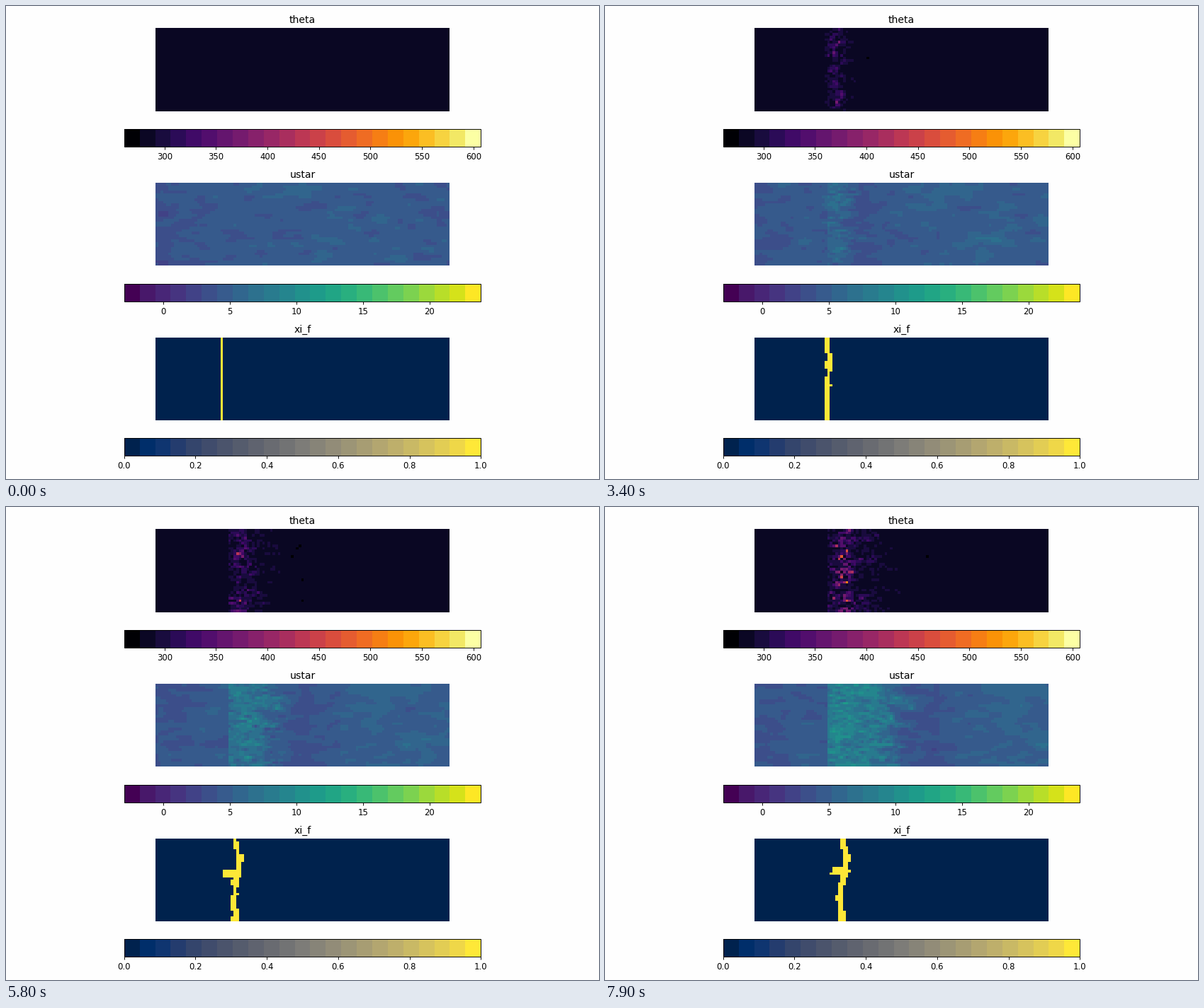
These frames come from a looping animation (837x669 px, 8000 ms). A matplotlib script:

```python
import numpy as np
import matplotlib.pyplot as plt
from matplotlib import colormaps
from matplotlib.animation import FuncAnimation
from matplotlib.colors import ListedColormap

W, H, DPI = 837, 669, 83.7
ROWS, COLS = 32, 113
FRAMES, INTERVAL = 80, 100
WIND = 7  # cells per second
BANDS = 23
PITCH = 218.8  # vertical distance between panels in pixels

# Times and rows at which part of the fire line burns on behind the rest
FINGERS = [(5.0, 9), (5.8, 13), (6.7, 22), (7.9, 12)]

PANELS = [("theta", "inferno", 260.8, 607.2),
          ("ustar", "viridis", -2.92, 23.86),
          ("xi_f", "cividis", 0, 1)]

plt.rcParams["font.family"] = "DejaVu Sans"
rng = np.random.default_rng(12)
col = np.arange(COLS)[None, :]
row = np.arange(ROWS)[:, None]


def noise_pair(length, height):
    """Two unit-variance noise sheets with streaks of the given size."""
    sheets = []
    for _ in range(2):
        sheet = rng.normal(size=(ROWS, 200))
        for axis, size in ((1, length), (0, height)):
            kernel = np.hanning(size + 2)[1:-1]
            sheet = np.apply_along_axis(np.convolve, axis, sheet, kernel, "same")
        sheets.append(sheet / sheet.std())
    return sheets


def block_pair():
    """Two random columns that are constant over groups of three rows."""
    return [np.repeat(rng.normal(size=11), 3)[:ROWS, None] for _ in range(2)]


streaks = noise_pair(9, 3)
gusts = noise_pair(3, 1)
heat = noise_pair(2, 1)
cold = noise_pair(1, 2)
line_shift, line_width = block_pair(), block_pair()


def blend(pair, t, rate):
    return np.cos(rate * t) * pair[0] + np.sin(rate * t) * pair[1]


def drift(pair, t, rate):
    """Noise carried along by the wind while it slowly changes."""
    start = 70 - round(WIND * t)
    return blend(pair, t, rate)[:, start:start + COLS]


def blob(c, r, width, height):
    return np.exp(-((col - c) / width) ** 2 - ((row - r) / height) ** 2)


def theta_field(t):
    edge = 27 if t < 4 else 28
    peak = 28 + 0.7 * t
    rise = np.clip((col - edge + 2) / (peak - edge + 2), 0, 1)
    decay = np.exp(-np.maximum(col - peak, 0) / (0.8 + 0.68 * t))
    patches = np.clip(0.85 + 0.4 * drift(streaks, t, 0.12), 0.1, 1.5)
    amount = (4 + 6 * t) * min(t / 1.2, 1)
    warm = amount * rise * decay * patches * (col >= edge)
    warm *= np.abs(drift(heat, t, 0.6)) ** 1.4
    depth = np.interp(t, [0.3, 0.9, 1.7, 3.4, 7.9], [0, 8, 8.5, 4.8, 4])
    spread = np.interp(t, [1.7, 3.4], [3, 8])
    chill = depth * np.exp(-((col - 28 - 4.5 * t) / spread) ** 2)
    return 286 + warm - chill * np.maximum(drift(cold, t, 0.1), 0)


def ustar_field(t):
    streak = drift(streaks, t, 0.12)
    field = 4.6 + 0.4 * streak
    field -= 0.75 * np.exp(-(col / 14) ** 2)
    field -= 0.8 * np.exp(-t) * (blob(2, 10, 4, 3) + blob(3, 31, 8, 2))
    field += 0.8 * blob(59 + 6.8 * t, 2, 11, 4)
    field += 0.8 * min(t / 3, 1) * blob(40 + WIND * t, 9, 7, 4)
    field += 0.8 * min(t / 3, 1) * blob(76 + 4 * t, 21, 10, 3)
    field -= 0.9 * blob(102 + WIND * t, 10, 6, 1.5)
    field += 0.04 * t * (col > 70)

    # Gusty plume behind the fire line, with calmer air ahead of it
    growth = max(t - 1.5, 0)
    reach = 1 + 4.1 * growth
    along = (col - 28) / reach
    plume = (col >= 28) / (1 + np.exp((along - 1) * reach / 2 - 1.2 * streak))
    rise = 0.5 + 0.5 * np.clip((col - 27) / 5, 0, 1)
    strength = min(growth, 1) * 0.62 * (t - 0.6)
    field += plume * strength * rise * (1 - 0.5 * np.clip(along, 0, 1))
    field += plume * min(growth, 2.4) * 0.45 * drift(gusts, t, 0.4)
    wake = 30 + reach + 1.5 * growth
    field -= 0.75 * min(growth / 2, 1) * np.exp(-((col - wake) / (4 + growth)) ** 2)
    return field


def fire_field(t):
    grown = min(t, 1)
    center = 25 + 0.6 * t + 0.06 * t ** 2
    center = center + 0.25 * max(t - 1.5, 0) * np.sin(2 * np.pi * row / ROWS)
    center = center + 0.4 * grown * blend(line_shift, t, 0.4)
    half = grown * np.clip(0.6 + 0.25 * blend(line_width, t, 0.6), 0.3, 1.2)
    left, right = np.round(center - half), np.round(center + half)
    for when, where in FINGERS:
        left = left - 4 * ((abs(t - when) < 0.45) & (abs(row - where) < 2))
    return ((col >= np.maximum(left, 25)) & (col <= right)).astype(float)


def fields(frame):
    t = frame * INTERVAL / 1000 if frame >= 4 else 0
    return theta_field(t), ustar_field(t), fire_field(t)


def banded(name):
    """Colormap reduced to flat bands that keep the two end colours."""
    picks = (np.arange(BANDS) + 0.5) / BANDS
    picks[0], picks[-1] = 0, 1
    return ListedColormap(colormaps[name](picks))


def pixel_axes(left, top, right, bottom):
    """Axes whose edges lie on whole pixels."""
    top, bottom = round(top), round(bottom)
    inset = 0.02
    return fig.add_axes([(left + inset) / W, 1 - (bottom - inset) / H,
                         (right - left - 2 * inset) / W,
                         (bottom - top - 2 * inset) / H])


fig = plt.figure(figsize=((W + 0.01) / DPI, (H + 0.01) / DPI), dpi=DPI,
                 facecolor="#fefefe")
images = []
for n, (title, cmap, low, high) in enumerate(PANELS):
    shift = PITCH * n
    ax = pixel_axes(211, 31 + shift, 626, 148.6 + shift)
    image = ax.imshow(np.zeros((ROWS, COLS)), cmap=banded(cmap), vmin=low,
                      vmax=high, interpolation="nearest", aspect="auto")
    ax.set_title(title)
    ax.axis("off")
    bar = pixel_axes(166.7, 173.8 + shift, 670.3, 198.8 + shift)
    fig.colorbar(image, cax=bar, orientation="horizontal")
    images.append(image)


def update(frame):
    for image, data in zip(images, fields(frame)):
        image.set_data(data)
    return images


anim = FuncAnimation(fig, update, frames=FRAMES, interval=INTERVAL,
                     repeat=True, repeat_delay=0, blit=False)
plt.show()
```
